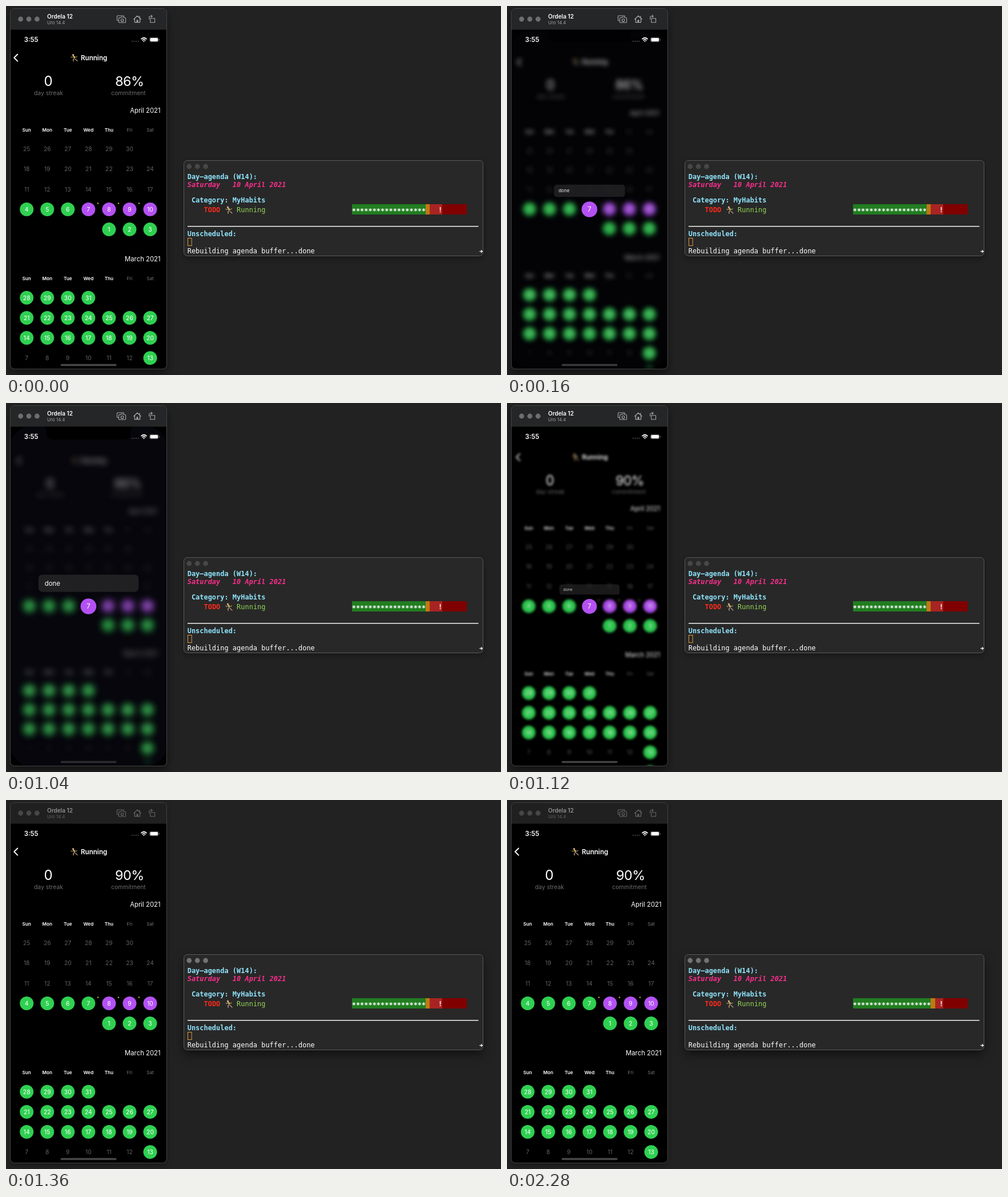
Animation of 867x646 px, one loop 2400 ms. Source, as an HTML page:

```html
<!DOCTYPE html>
<html lang="en">
<head>
<meta charset="utf-8">
<title>Habit tracker</title>
<style>
html, body { margin: 0; width: 100%; height: 100%; overflow: hidden; background: #222; }
svg { display: block; width: 867px; height: 646px; }
text { white-space: pre; font-family: Inter, "Liberation Sans", sans-serif; }
.mono text { font: 11.96px "DejaVu Sans Mono", "Liberation Mono", monospace; }
.mono .b { font-weight: 700; }
.mono .i { font-style: italic; }
.line { fill: none; stroke-linecap: round; stroke-linejoin: round; }
</style>
</head>
<body>
<svg id="stage" viewBox="0 0 867 646" xmlns="http://www.w3.org/2000/svg"></svg>
<script>
const LOOP = 2400, STEP = 40;
const GREEN = '#2fd051', PURPLE = '#b451f4', GREY = '#606060';
const COL = 7.2, LEFT = 317.7;

const text = (x, y, s, size, fill = '#fff', extra = '') =>
  `<text x="${x}" y="${y}" font-size="${size}" fill="${fill}" ${extra}>${s}</text>`;
const mid = 'text-anchor="middle"', end = 'text-anchor="end"';
const rect = (x, y, w, h, fill, extra = '') =>
  `<rect x="${x}" y="${y}" width="${w}" height="${h}" fill="${fill}" ${extra}/>`;
const circle = (x, y, r, fill, extra = '') =>
  `<circle cx="${x}" cy="${y}" r="${r}" fill="${fill}" ${extra}/>`;
const line = (d, stroke, width, extra = '') =>
  `<path class="line" d="${d}" stroke="${stroke}" stroke-width="${width}" ${extra}/>`;

const lights = (x, y) => [0, 14.4, 28.8].map(dx => circle(x + dx, y, 4.4, 'currentColor')).join('');

const runner = (x, y) => `<g transform="translate(${x} ${y})">` +
  line('M7 8 L9.4 10 L12 12.6 M6.6 8 L4.8 10 L5.2 12.8', '#d9ae80', 1.2) +
  line('M4.6 4.6 L2.6 6.4 L1 5.2 M7.4 4.8 L9.6 6 L11.4 4.6', '#efca9b', 1) +
  line('M5.8 4.4 L6.8 7', '#d9c24e', 2.2) +
  line('M6.8 8 L8.2 9', '#5b6470', 1.8) +
  circle(4.6, 1.9, 1.6, '#efca9b') + line('M4.2 .5 L6 1.2', '#6a4a2c', 1) + '</g>';

function cell(day, col, y, fill) {
  const x = 36.2 + col * 36.05;
  return (fill ? circle(x, y, 12, fill) : '') +
    text(x, y + 3.7, day, 10.3, fill ? '#fff' : GREY, mid);
}

function month(title, top, firstRow, bases, last, colour) {
  let s = text(270.5, top, title, 11.3, '#fff', end);
  'Sun Mon Tue Wed Thu Fri Sat'.split(' ').forEach((d, i) => {
    s += text(36.2 + i * 36.05, firstRow - 31.1, d, 8.2, i < 5 ? '#fff' : '#777',
      mid + ` font-weight="${i < 5 ? 600 : 400}"`);
  });
  bases.forEach((base, r) => {
    for (let c = 0; c < 7; c++) {
      const day = base + c;
      if (day < 1 || day > last) continue;
      const item = cell(day, c, firstRow + r * 35.13, colour(day));
      s += day === 7 && last === 30 ? `<g id="seven">${item}</g>` : item;
    }
  });
  return s;
}

const aprilColour = d => d <= 6 ? GREEN : d <= 10 ? PURPLE : '';
const marchColour = d => d >= 13 || d === 6 ? GREEN : '';

const content =
  line('M20.3 84.5 L14.2 90.5 L20.3 96.6', '#fff', 1.9) +
  runner(113, 83.8) + text(131, 94.8, 'Running', 11.6, '#fff', 'font-weight="600"') +
  text(74, 140.3, '0', 24, '#fff', mid) +
  text(216.3, 140.3, '', 23.4, '#fff', mid + ' id="percent" letter-spacing="-.6"') +
  text(74.5, 156, 'day streak', 10.4, '#6c6c6c', mid) +
  text(214.5, 156, 'commitment', 10.3, '#6c6c6c', mid) +
  month('April 2021', 186.8, 250.6, [25, 18, 11, 4, -3], 30, aprilColour) +
  [161, 197, 233].map(x => circle(x, 345.6, 1.3, '#b59a52')).join('') +
  month('March 2021', 447, 510.8, [28, 21, 14, 7, 0], 31, marchColour);

const titleBar =
  `<g id="phoneBar">` +
  `<g color="#6e6e6e">${lights(25.6, 23)}</g>` +
  text(72, 21.6, 'Ordela 12', 10, '#fff', 'font-weight="600"') +
  text(72, 31.6, 'Uro 14.4', 8, '#a0a0a0') +
  line('M196.5 25.5 H195.5 Q194.5 25.5 194.5 24.5 V18 Q194.5 17 195.5 17 H205.5 Q206.5 17 206.5 18 V18.5', '#a9a9a9', 1.1) +
  line('M198.5 20.5 H200.5 L201.5 19.3 H206 L207 20.5 H208.5 Q209.6 20.5 209.6 21.5 V28 Q209.6 29 208.5 29 H198.5 Q197.5 29 197.5 28 V21.5 Q197.5 20.5 198.5 20.5 Z', '#a9a9a9', 1.1) +
  circle(203.6, 24.8, 2.3, 'none', 'stroke="#a9a9a9" stroke-width="1.1"') +
  line('M223.7 23.2 L230 17.2 L236.3 23.2 M225.4 22 V28.7 H234.6 V22 M234 17.8 V20', '#a9a9a9', 1.2) +
  rect(228.6, 24.2, 2.8, 4.5, '#a9a9a9') +
  line('M252.8 21.7 H260.6 V28.7 H252.8 Z M250.7 23 V20 Q250.7 18 252.7 18 H256 M254.3 16.2 L256.2 18 L254.3 19.8', '#a9a9a9', 1.1) +
  `</g>`;

const statusBar =
  text(31.8, 63, '3:55', 11.3, '#fff', 'font-weight="600"') +
  [221, 224.5, 228, 231.5].map(x => circle(x, 61.8, .95, '#555')).join('') +
  line('M237 57.6 Q241.5 53.9 246 57.6', '#fff', 1.7) +
  line('M238.9 60 Q241.5 57.9 244.1 60', '#fff', 1.6) + circle(241.5, 62, 1.1, '#fff') +
  rect(251.5, 55.1, 15.5, 7.8, 'none', 'rx="2.3" stroke="#777" stroke-width=".7"') +
  rect(252.5, 56.1, 13.5, 5.8, '#fff', 'rx="1.4"') + rect(267.8, 57.7, .9, 2.6, '#888', 'rx=".4"');

const phone =
  rect(8, 4.5, 273, 630.5, '#000', 'rx="7" id="phoneShadow"') +
  `<g clip-path="url(#phoneClip)">` +
  rect(8, 4.5, 273, 37, '#242627', 'id="phoneTop"') + titleBar +
  `<g clip-path="url(#screenClip)">` +
  rect(8, 41.5, 273, 593.5, '#06060c', 'rx="34" id="veil"') +
  `<g id="content"><g clip-path="url(#scrollClip)">${content}</g></g>` +
  `<path id="notch" d="M64 41 Q71 42 71 48 V52 Q71 64 83 64 H206 Q218 64 218 52 V48 Q218 42 225 41 Z"/>` +
  `<g id="lifted">${circle(0, 0, 12, PURPLE)}${text(0, 3.7, '7', 10.3, '#fff', mid)}</g>` +
  `<g id="menu">${rect(56.7, 300.4, 175.6, 30.3, '#202022', 'rx="7"')}${text(67.8, 319.6, 'done', 11.4)}</g>` +
  `<g id="toast">${rect(18.5, 543, 252, 57.8, '#000', 'rx="5.5" stroke="#505050"')}` +
  text(30, 565.3, 'Done', 11.4, '#fff', 'font-weight="500"') + runner(30.8, 576) +
  text(49, 586.5, 'Running', 11.4, '#858585') + text(259, 576.2, 'undo', 11.2, '#3474e8', end) + `</g>` +
  statusBar + rect(95.6, 626.8, 98, 3.4, '#484848', 'rx="1.7" id="homeBar"') +
  `</g></g>` +
  rect(7.5, 4.5, 274, 631, 'none', 'rx="7" stroke="#444"');

const mono = (col, y, s, fill, cls = '') =>
  `<text x="${LEFT + col * COL}" y="${y}" fill="${fill}" class="${cls}">${s}</text>`;
const CYAN = '#8fe3fb';

const agenda =
  rect(311.5, 270.5, 524, 167, '#282828', 'rx="6" id="agendaShadow"') +
  rect(311.5, 270.5, 524, 167, '#282828', 'rx="6" stroke="#5a5a5a"') +
  `<g id="agendaLights">${lights(320.8, 281)}</g><g class="mono">` +
  mono(0, 303, 'Day–agenda (W14):', CYAN, 'b') +
  mono(0, 316.6, 'Saturday   10 April 2021', '#fb2e8c', 'b i') +
  mono(1, 344, 'Category: MyHabits', CYAN, 'b') +
  mono(4, 361.2, 'TODO', '#fa2a1c', 'b') + runner(384, 350.3) +
  mono(12, 361.2, 'Running', '#93d654') +
  `<g id="graph"></g>` +
  rect(318, 385, 509.5, 1.5, '#f0f0f0') +
  mono(0, 403.2, 'Unscheduled:', CYAN, 'b') +
  rect(318.5, 406.5, 6.7, 13, 'none', 'id="cursor"') +
  mono(0, 433.4, 'Rebuilding agenda buffer...done', '#fff') +
  line('M829.8 429.6 H834.4 M832.3 427.6 L834.4 429.6 L832.3 431.6', '#fff', 1.2) + `</g>`;

const clip = (id, shape) => `<clipPath id="${id}">${shape}</clipPath>`;
const stage = document.getElementById('stage');
stage.innerHTML = '<defs>' +
  clip('phoneClip', rect(8, 4.5, 273, 630.5, '#000', 'rx="7"')) +
  clip('screenClip', rect(8, 41.5, 273, 593.5, '#000')) +
  clip('scrollClip', rect(8, 41.5, 273, 601, '#000')) + '</defs>' +
  phone + agenda;

const $ = id => document.getElementById(id);
const show = (id, opacity) => {
  $(id).style.opacity = opacity;
  $(id).style.visibility = opacity > 0 ? 'visible' : 'hidden';
};
const scaleAbout = (x, y, k) => `translate(${x} ${y}) scale(${k}) translate(${-x} ${-y})`;

function graph(done) {
  const x = col => LEFT - .2 + (40 + col) * COL;
  const bar = (from, to, fill) => rect(x(from), 347, (to - from) * COL, 18, fill, 'shape-rendering="crispEdges"');
  return bar(0, done, '#217d20') + bar(done, done + 1, '#bd7a12') +
    bar(done + 1, 22, '#a82422') + bar(22, 28, '#800000') +
    mono(40, 363.3, '*'.repeat(done), '#fff', 'b') + mono(61, 361.2, '!', '#fff', 'b');
}

// Critically damped spring for opening the menu
function opening(t) {
  if (t < 40) return 0;
  if (t >= 440) return 1;
  const k = t * .0155;
  return 1 - (1 + k) * Math.exp(-k);
}
const blurAt = t => t < 1120 ? opening(t) : t < 1160 ? .4 : 0;
const menuAt = t => t < 1120 ? opening(t) : t < 1160 ? .6 : t < 1200 ? .17 : 0;

function cursorAt(t) {
  if (t < 1520) return 'hollow';
  return t < 1880 || (t >= 2080 && t < 2280) ? 'solid' : 'off';
}

let shown = -1;
function draw(t) {
  if (t === shown) return;
  shown = t;
  const p = blurAt(t), m = menuAt(t), focus = t >= 1280;

  const content = $('content');
  content.setAttribute('transform', scaleAbout(144.4, 340, 1 - .043 * p));
  content.style.filter = p ? `blur(${6 * p}px)` : 'none';
  content.style.opacity = 1 - .34 * p * p;
  show('veil', p * p);
  show('notch', p * p);
  $('homeBar').style.opacity = 1 - .4 * p * p;

  show('lifted', p > 0 ? 1 : 0);
  $('lifted').setAttribute('transform', `translate(144.4 356) scale(${1 + .15 * Math.min(1, p * 1.4)})`);
  show('seven', p > 0 ? 0 : 1);
  $('seven').firstChild.setAttribute('fill', t >= 1200 ? GREEN : PURPLE);

  show('menu', Math.min(1, m * 1.3));
  $('menu').setAttribute('transform', scaleAbout(144.5, 343, Math.max(m, .01)));
  show('toast', t >= 1160 && t < 1320 ? 1 : t >= 1320 && t < 1360 ? .5 : 0);
  $('percent').textContent = t >= 1120 ? '90%' : '86%';

  $('phoneBar').style.opacity = focus ? .5 : 1;
  $('phoneTop').setAttribute('fill', focus ? '#202020' : '#242627');
  $('agendaLights').style.color = focus ? '#737373' : '#484848';
  const big = 'drop-shadow(0 8px 9px rgba(0,0,0,.5))', small = 'drop-shadow(0 4px 5px rgba(0,0,0,.35))';
  $('phoneShadow').style.filter = focus ? small : big;
  $('agendaShadow').style.filter = focus ? big : small;

  $('graph').innerHTML = graph(t >= 1680 ? 19 : 18);
  const state = cursorAt(t), cursor = $('cursor');
  cursor.setAttribute('fill', state === 'solid' ? '#eca31f' : 'none');
  cursor.setAttribute('stroke', state === 'off' ? 'none' : state === 'solid' ? '#eca31f' : '#dd9840');
}

const start = performance.now();
function tick() {
  const t = (performance.now() - start) % LOOP;
  draw(Math.floor(t / STEP) * STEP);
  requestAnimationFrame(tick);
}
draw(0);
requestAnimationFrame(tick);
</script>
</body>
</html>
```
